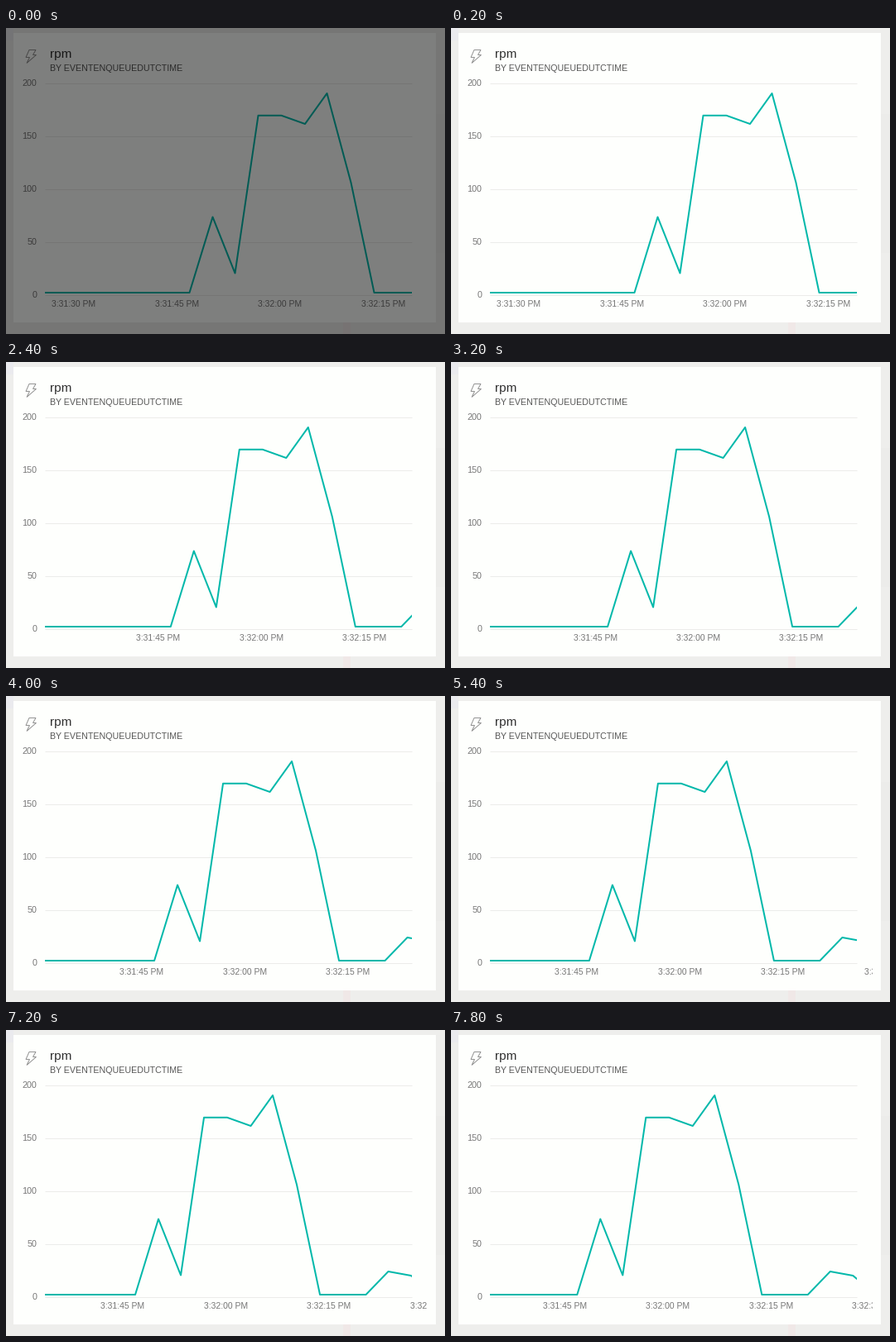
A matplotlib script that plays this animation: 530 by 370 pixels, repeating every 8 s.

```python
import matplotlib.pyplot as plt
import numpy as np
from matplotlib.animation import FuncAnimation
from matplotlib.patches import Polygon, Rectangle

W, H, DPI = 530, 370, 100
FRAMES, INTERVAL = 40, 200
PX = 72 / DPI  # points per pixel

TEAL, GREY, GRID = "#01b8aa", "#777777", "#ececea"
LEFT, RIGHT, BASE = 47, 490, 320
TICK_GAP = 124.5

plt.rcParams["font.family"] = "Liberation Sans"
plt.rcParams["toolbar"] = "None"

fig = plt.figure(figsize=(W / DPI, H / DPI), dpi=DPI, facecolor="#eeeeec")
ax = fig.add_axes([0, 0, 1, 1])
ax.set_xlim(0, W)
ax.set_ylim(H, 0)
ax.axis("off")


def box(x, y, w, h, color, **kw):
    return ax.add_patch(Rectangle((x, y), w, h, fc=color, lw=0, **kw))


def label(x, y, text, size, color=GREY, ha="left"):
    return ax.text(x, y, text, fontsize=size * PX, color=color,
                   ha=ha, va="baseline", zorder=4)


def clip_area(x, y, w, h):
    return Rectangle((x, y), w, h, transform=ax.transData)


# Page and card
box(0, 0, 9, 15, "#eaeaee")
box(519, 104, 11, 168, "#ececea")
box(407, 356, 9, 14, "#f0e8e7")
box(9, 6, 510, 350, "#fefffd")

# Header
bolt = [(28, 26.5), (36, 26.5), (32.5, 32.5), (36.5, 32.5),
        (25, 42.5), (28.5, 35.5), (24, 35.5)]
ax.add_patch(Polygon(bolt, fc="none", ec="#8a8a8a", lw=0.9 * PX))
label(53, 36, "rpm", 15.4, "#333333")
label(53, 52, "BY EVENTENQUEUEDUTCTIME", 10.6, "#555555")

# Value axis
for value in range(0, 201, 50):
    y = round(321.5 - value * 1.28) + 0.5
    ax.plot([LEFT, RIGHT], [y, y], color=GRID, lw=PX,
            solid_capstyle="butt", zorder=1)
    label(37.5, y + 3.5, str(value), 10.7, ha="right")

# Readings, in pixels at the start of the scroll
xs = np.array([-60, 221.5, 249.5, 276.5, 304.5, 332.5, 361, 387.5, 416.5,
               444.5, 500, 527, 554.5, 582])
ys = np.array([BASE, BASE, 228.5, 296.5, 105.8, 105.8, 116, 79, 187,
               BASE, BASE, 292, 297, BASE])
line, = ax.plot(xs, ys, color=TEAL, lw=2 * PX, solid_joinstyle="round", zorder=3)
line.set_clip_path(clip_area(LEFT, 60, RIGHT - LEFT, 270))

# Time axis
times = ["3:31:30 PM", "3:31:45 PM", "3:32:00 PM", "3:32:15 PM", "3:32:30 PM"]
ticks = []
for t in times:
    tick = label(0, 337, t, 10.4, ha="center")
    tick.set_clip_on(True)
    tick.set_clip_path(clip_area(0, 0, 509, H))
    ticks.append(tick)

shade = box(0, 0, W, H, "black", alpha=0.5, zorder=10)


def scroll(i):
    """Distance scrolled; the chart stalls for a moment past the middle."""
    return np.interp(i, [1, 8, 16, 24, 26, 27, 32, 39],
                     [0, 13, 32.4, 52.5, 52.5, 54.6, 60.5, 69.2])


def update(i):
    off = scroll(i)
    shade.set_visible(i == 0)
    line.set_xdata(xs - off)
    for k, tick in enumerate(ticks):
        tick.set_x(82 + k * TICK_GAP - off)
    # The first time label is cut short and fades as it leaves
    ticks[0].set_text(times[0] + ("..." if off > 8 else ""))
    ticks[0].set_alpha(float(np.clip((20 - off) / 13, 0, 1)))
    return [line, shade, *ticks]


anim = FuncAnimation(fig, update, frames=FRAMES, interval=INTERVAL,
                     repeat=True, repeat_delay=0, blit=False)
plt.show()
```
